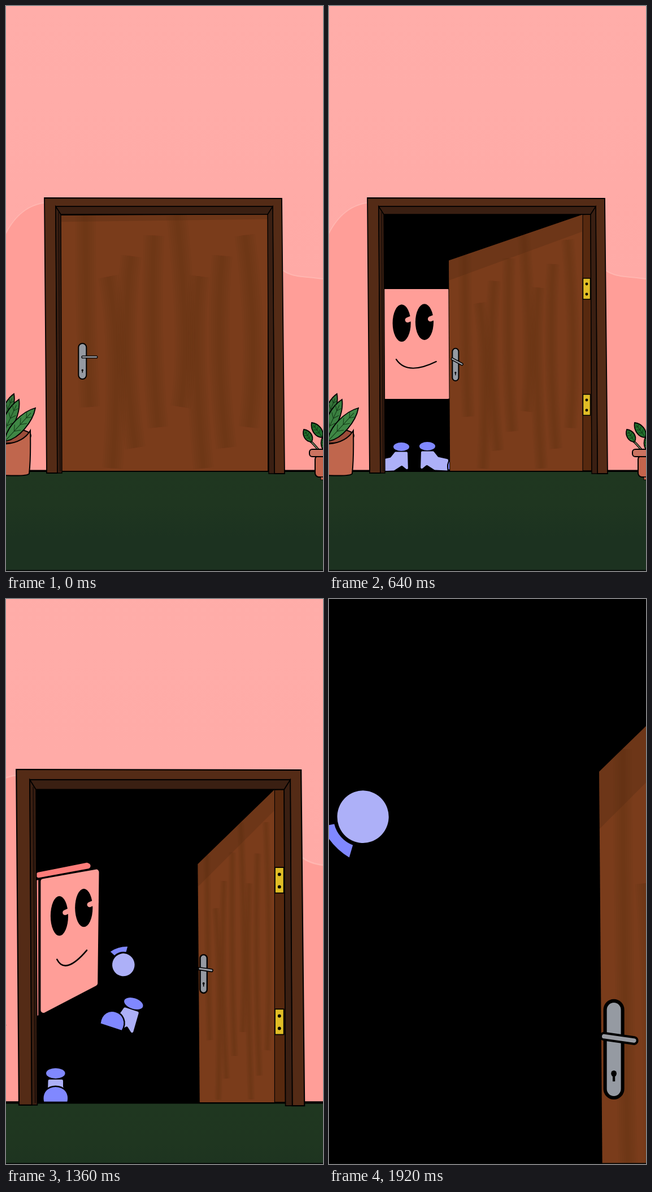
Animation, 561 px wide and 998 px high, one loop 2 s. Source, as an HTML page with a canvas:

```html
<!DOCTYPE html>
<html lang="en">
<head>
<meta charset="utf-8">
<title>Opening door</title>
<style>
html, body { margin: 0; width: 100%; height: 100%; overflow: hidden; background: #000; }
canvas { display: block; width: 561px; height: 998px; }
</style>
</head>
<body>
<canvas id="stage" width="561" height="998"></canvas>
<script>
const ctx = document.getElementById('stage').getContext('2d');
const W = 561, H = 998, LOOP = 2000, STEP = 80;
const RAD = Math.PI / 180;
const LILAC = '#adb0f8', VIOLET = '#8088ff', SKIN = '#ff9e98', POST = '#542b16', JAMB = '#3a1f12';

// Poses: [time, ...values], blended linearly
const camera = [ // scale x, scale y, shift x, shift y
  [640, 1, 1, 0, 0], [1120, 1.033, 1.025, -4.4, -10], [1360, 1.2, 1.22, -63.4, -112.6],
  [1520, 1.746, 1.775, -218, -419], [1680, 2.16, 2.196, -314, -656], [1920, 3.036, 3.087, -541, -1165]
];
const body = [ // left, right, then top left, top right, bottom right, bottom left
  [1120, 80, 219, 500, 500, 694, 694], [1360, 104, 190, 498, 483, 651, 694],
  [1520, 73, 144, 513, 455, 642, 687], [1680, 20, 100, 530, 440, 640, 690]
];
const hand = [ // x, y, radius, cuff angle
  [1120, 277.6, 683.6, 18, 240], [1360, 226, 622, 16.5, 254],
  [1520, 213, 572, 16, 247], [1680, 198, 502, 15, 138]
];
const feet = [ // x, y, scale, tilt, turn (-1 left, 1 right)
  [[1120, 128, 778.5, 1, 0, -1], [1360, 126, 779, 1, 0, 0], [1520, 70, 779, 1, 0, 0]],
  [[1120, 174, 777.5, 1, 0, 1], [1360, 241, 678, 1.03, 18, -.4], [1520, 138, 742, .78, -28, 1], [1680, 140, 785, .78, -28, 1]]
];

const mix = (a, b, k) => a + (b - a) * k;
const clamp = k => Math.max(0, Math.min(1, k));

function at(keys, t) {
  const i = keys.findIndex(k => k[0] > t);
  if (i === 0) return keys[0].slice(1);
  if (i < 0) return keys[keys.length - 1].slice(1);
  const a = keys[i - 1], b = keys[i], k = (t - a[0]) / (b[0] - a[0]);
  return a.slice(1).map((v, j) => mix(v, b[j + 1], k));
}

function paint(fill, line, width = 1.6) {
  if (fill) { ctx.fillStyle = fill; ctx.fill(); }
  if (line) { ctx.strokeStyle = line; ctx.lineWidth = width; ctx.stroke(); }
}

function poly(p, fill, line, width) {
  ctx.beginPath();
  for (let i = 0; i < p.length; i += 2) ctx.lineTo(p[i], p[i + 1]);
  ctx.closePath();
  paint(fill, line, width);
}

function roundPoly(p, r, fill, line, width) {
  const n = p.length;
  ctx.beginPath();
  ctx.moveTo((p[0] + p[2]) / 2, (p[1] + p[3]) / 2);
  for (let i = 2; i <= n; i += 2) {
    ctx.arcTo(p[i % n], p[(i + 1) % n], p[(i + 2) % n], p[(i + 3) % n], r);
  }
  ctx.closePath();
  paint(fill, line, width);
}

function oval(x, y, rx, ry, fill, line, width) {
  ctx.beginPath();
  ctx.ellipse(x, y, rx, ry, 0, 0, 7);
  paint(fill, line, width);
}

function rect(x, y, w, h, fill, line, width) {
  ctx.beginPath();
  ctx.rect(x, y, w, h);
  paint(fill, line, width);
}

function curve(p, line, width) {
  ctx.beginPath();
  ctx.moveTo(p[0], p[1]);
  ctx.quadraticCurveTo(p[2], p[3], p[4], p[5]);
  paint(null, line, width);
}

function ramp(x0, y0, x1, y1, ...colors) {
  const g = ctx.createLinearGradient(x0, y0, x1, y1);
  colors.forEach((c, i) => g.addColorStop(i / (colors.length - 1), c));
  return g;
}

function placed(x, y, deg, scale, fn) {
  ctx.save();
  ctx.translate(x, y);
  ctx.rotate(deg * RAD);
  ctx.scale(scale, scale);
  fn();
  ctx.restore();
}

function wall() {
  rect(0, 0, W, 823, ramp(0, 0, 0, 480, '#ffada9', '#ffaaa6'));
  ctx.beginPath();
  ctx.moveTo(0, 403);
  ctx.bezierCurveTo(18, 368, 42, 351, 72, 348);
  ctx.lineTo(486, 465);
  ctx.bezierCurveTo(505, 481, 525, 478, 561, 483);
  paint(null, 'rgba(255,190,184,.6)', 4);
  ctx.lineTo(561, 823);
  ctx.lineTo(0, 823);
  ctx.closePath();
  paint(SKIN);
  rect(0, 819.5, W, 4, '#000');
  rect(0, 823, W, 240, ramp(0, 823, 0, 998, '#1f3720', '#1f3620', '#1c3220', '#1c3220'));
}

function leaf(x, y, tipX, tipY, w, fill) {
  const len = Math.hypot(tipX - x, tipY - y);
  placed(x, y, Math.atan2(tipY - y, tipX - x) / RAD, 1, () => {
    ctx.beginPath();
    ctx.moveTo(0, 0);
    ctx.bezierCurveTo(len * .25, -w, len * .75, -w * .8, len, 0);
    ctx.bezierCurveTo(len * .75, w * .8, len * .25, w, 0, 0);
    paint(fill, '#000', 1.8);
    ctx.beginPath();
    ctx.moveTo(0, 0);
    ctx.lineTo(len * .85, 0);
    for (let k = .3; k < .8; k += .2) {
      for (const side of [-1, 1]) {
        ctx.moveTo(len * k, 0);
        ctx.lineTo(len * (k + .12), side * w * .45);
      }
    }
    paint(null, '#123a16', 1);
  });
}

function plants() {
  oval(4, 759, 40, 13, '#9c4d3a', '#000', 2);
  leaf(-8, 740, 14, 685, 12, '#35743a');
  leaf(-8, 762, 23, 695, 15, '#3a7f40');
  leaf(-2, 769, 52, 710, 16, '#3f8745');
  ctx.beginPath();
  ctx.moveTo(-5, 774);
  ctx.quadraticCurveTo(30, 772, 43, 750);
  ctx.quadraticCurveTo(44, 800, 41, 826);
  ctx.quadraticCurveTo(38, 831, -5, 829);
  ctx.closePath();
  paint('#c0664d', '#000', 2);

  curve([538, 768, 545, 774, 553, 784], '#000', 4);
  curve([538, 768, 545, 774, 553, 784], '#8fa57a', 1.4);
  leaf(541, 770, 527, 748, 10, '#21702c');
  leaf(560, 762, 541, 736, 11, '#21702c');
  leaf(562, 784, 560, 762, 5, '#2a8035');
  roundPoly([547, 794, 575, 794, 575, 832, 547, 832], 7, '#c4644c', '#000', 2);
  roundPoly([537, 783, 580, 783, 580, 796, 537, 796], 5, '#cb7360', '#000', 2);
  rect(557, 832, 8, 5, '#c4644c', '#000', 1);
}

function frame() {
  poly([68, 339, 488, 340, 493, 826, 475, 826, 472, 354, 88, 354, 91, 825, 72, 825], POST, '#000', 1.8);
  poly([88, 354, 97, 368, 99, 825, 91, 825], JAMB, '#000', 1.4);
  poly([472, 354, 463, 368, 465, 826, 475, 826], JAMB, '#000', 1.4);
  poly([88, 354, 472, 354, 463, 368, 97, 368], JAMB, '#000', 1.4);
  poly([92, 364, 94, 364, 97, 822, 95, 822], '#1f100a');
}

function door(t) {
  const deg = Math.min(71.1, t * .0744), sin = Math.sin(deg * RAD);
  const open = clamp(deg / 10);
  const x = 450 - 353 * Math.cos(deg * RAD), y = 370 + (98 + .2 * deg) * sin;
  const hx = 463 - 14.5 * open, top = 368.5, lean = 3 * sin, wide = hx - x;
  const quad = [x, y, hx, top, hx, 821, x + lean, 821];
  const spot = (u, v) => {
    const head = mix(y, top, u);
    return [x + lean * v * (1 - u) + wide * u, mix(head, 821, v)];
  };

  poly([hx, top, 463, 368, 465, 821, hx, 821], '#57290f', '#000', 1.4);
  poly(quad, null, '#000', 2);
  ctx.save();
  poly(quad, '#7a3c1b');
  ctx.clip();
  // soft wood grain
  for (let i = 0; i < 8; i++) {
    const u = .12 + i * .11, v = .08 * (i * 3 % 4);
    const line = [...spot(u, v), ...spot(u + .07 * Math.sin(i * 2), .5), ...spot(u + .02, .75 + v)];
    for (let k = 1; k < 6; k++) curve(line, 'rgba(80,38,15,.055)', wide * .02 * k);
  }
  const band = .025 + .07 * open;
  poly([x, y, hx, top, ...spot(1, band * .7), ...spot(0, band)], 'rgba(80,40,18,.3)');
  ctx.restore();

  for (const hy of open ? [481, 686] : []) {
    rect(hx + 1, hy, 13 * open, 37, '#e0bd26', '#000', 1.4);
    for (const k of [10, 28]) oval(hx + 1 + 6.5 * open, hy + k, 2.4 * open, 2.4, '#000');
  }

  const press = 27 * Math.max(0, Math.sin(Math.min(t, 880) / 880 * Math.PI));
  drawHandle(x + 8.3 + 30 * (1 - sin) ** 1.6, 627.5 + 8 * sin, 14 - 4 * sin, 63 - 8 * sin, 8 * open + press, open);
}

function drawHandle(x, y, w, h, deg, open) {
  ctx.beginPath();
  ctx.roundRect(x - w / 2, y - h / 2, w, h, w / 2);
  paint('#959aa2', '#000', 2);
  oval(x, y + h * .25, 1.6, 1.8, '#000');
  rect(x - .7, y + h * .25, 1.4, 4.5, '#000');
  const from = -.1 - .65 * open, to = 1.9 - .55 * open;
  placed(x, y - h * .12, deg, 1, () => {
    ctx.beginPath();
    ctx.roundRect(w * from, -1.9, w * (to - from), 3.8, 1.9);
    paint('#999ca3', '#000', 1.3);
  });
}

function eye([x, y], rx, ry) {
  oval(x, y, rx, ry, '#000');
  ctx.beginPath();
  ctx.moveTo(x + rx * .65, y - ry * .17);
  ctx.lineTo(x + rx * 1.4, y - ry * .32);
  paint(null, SKIN, rx * .56);
}

function face(t) {
  const [l, r, tl, tr, br, bl] = at(body, t);
  const turn = clamp((t - 1120) / 240), wide = r - l;
  const spot = (u, v) => [l + wide * u, mix(mix(tl, tr, u), mix(bl, br, u), v)];
  const quad = [l, tl, r, tr, r - turn * 2, br, l, bl];
  if (turn) {
    roundPoly([l - 24, tl - 6, r - 18, tr - 9, r - 1, tr - 3, l - 3, tl - 2], 4, '#ff7d7a');
    poly([l - 18, tl + 4, l - 3.5, tl + 1, l - 3.5, bl + 1, l - 18, bl + 8], '#ff8d88');
  }
  const round = 9 - 5 * turn;
  roundPoly(quad, round, null, '#000', 4);
  roundPoly(quad, round, SKIN);
  ctx.save();
  ctx.clip();
  ctx.lineCap = 'round';
  const rx = 8 + wide * .058, ry = 11 + rx * 1.36;
  eye(spot(.35 - .03 * turn, .31), rx, ry);
  eye(spot(.64 + .1 * turn, .3), rx, ry - 1);
  curve([...spot(.28, .64), ...spot(.42, .79), ...spot(.79, .66)], '#000', 2.2);
  ctx.restore();
}

function shoe(x, y, scale, tilt, turn) {
  const k = Math.abs(turn), toe = 51 * k, rx = 18 - 3.5 * k;
  placed(x, y, tilt, scale, () => {
    if (turn < 0) ctx.scale(-1, 1);
    oval(0, 0, 14, 7.5, VIOLET);
    roundPoly([-11, 9, 11, 9, 11 + 8 * k, 19, 12 + 25 * k, 23, 12 + 25 * k, 43, 3 + 10 * k, 42, -1, 33, -12, 42], 2, LILAC);
    ctx.beginPath();
    ctx.moveTo(toe - rx, 42);
    ctx.bezierCurveTo(toe - rx * 1.4, 11, toe + rx * 1.4, 11, toe + rx, 42);
    ctx.closePath();
    paint(VIOLET, '#000', 2);
  });
}

function glove(x, y, r, deg) {
  const ring = (d, k) => [k * r * Math.cos(d * RAD), k * r * Math.sin(d * RAD)];
  placed(x, y, deg, 1, () => {
    ctx.beginPath();
    ctx.moveTo(...ring(-29, 1.64));
    ctx.quadraticCurveTo(...ring(0, 1.68), ...ring(29, 1.64));
    ctx.arc(0, 0, r * 1.15, 28 * RAD, -28 * RAD, true);
    ctx.closePath();
    paint(VIOLET);
    oval(0, 0, r, r, LILAC);
  });
}

function draw(t) {
  const [sx, sy, dx, dy] = at(camera, t);
  ctx.setTransform(1, 0, 0, 1, 0, 0);
  rect(0, 0, W, H, '#ffada9');
  ctx.setTransform(sx, 0, 0, sy, dx, dy);
  wall();
  ctx.save();
  poly([97, 368, 463, 368, 465, 821, 99, 821], '#000');
  ctx.clip();
  face(t);
  for (const foot of feet) shoe(...at(foot, t));
  glove(...at(hand, t));
  ctx.restore();
  door(t);
  frame();
  plants();
  ctx.setTransform(1, 0, 0, 1, 0, 0);
  rect(0, 996, W, 2, 'rgba(5,8,6,.85)');
}

function tick() {
  let t = Math.floor(performance.now() % LOOP / STEP) * STEP;
  if (t > 1120 && t < 1360) t = 1120; // short rest before the rush inside
  draw(t);
  requestAnimationFrame(tick);
}
tick();
</script>
</body>
</html>
```
